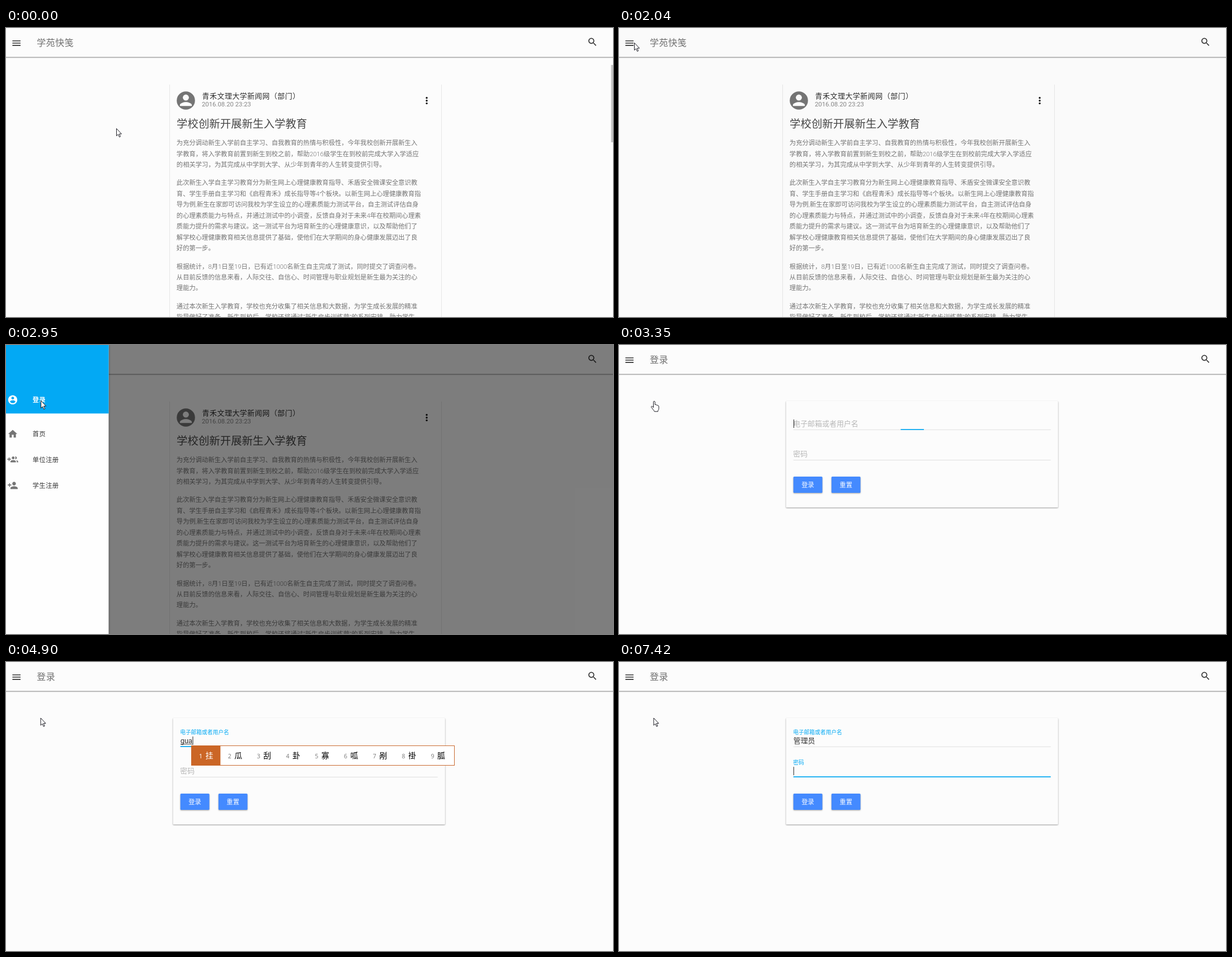
Animation, 1085 px wide and 516 px high, one loop 8000 ms. Source, as an HTML page:

```html
<!DOCTYPE html>
<html lang="zh-CN">
<head>
<meta charset="utf-8">
<title>登录演示</title>
<style>
  html, body { margin: 0; width: 100%; height: 100%; overflow: hidden; background: #fcfcfc; }
  svg { display: block; width: 1085px; height: 516px; }
  text { font-family: Roboto, "Noto Sans CJK SC", "Noto Sans CJK", sans-serif; white-space: pre; }
  .body { font-size: 11.34px; font-weight: 300; fill: #747474; }
  .title, .headline { font-family: "Noto Sans CJK SC Light", "Noto Sans CJK SC DemiLight", "Noto Sans CJK SC", "Noto Sans CJK", sans-serif; font-weight: 300; }
  .title { font-size: 16.2px; letter-spacing: .02em; fill: #707070; }
  .headline { font-size: 19.44px; fill: #484848; }
  .author { font-size: 12.96px; letter-spacing: .04em; fill: #2c2c2c; }
  .nav { font-size: 11.34px; font-weight: 500; letter-spacing: .04em; fill: #333; }
  .hint { font-size: 12.96px; font-weight: 300; fill: #b8b8b8; }
  .float { font-size: 9.72px; font-weight: 400; fill: #03a9f4; }
  .typed { font-size: 12.96px; fill: #333; }
  .button rect { fill: #448aff; filter: drop-shadow(0 1px 1px rgba(0,0,0,.35)); }
  .button text { font-size: 11.34px; fill: #fff; text-anchor: middle; }
  .card { fill: #fcfcfc; filter: drop-shadow(0 1px 1px rgba(0,0,0,.4)); }
  .pick { font-family: "Noto Sans CJK SC", "Noto Sans CJK", sans-serif; font-size: 13.9px; fill: #000; }
  .num { font-family: "Noto Sans", sans-serif; font-size: 10.5px; fill: #808080; }
  .on { fill: #fff; }
  .line { fill: #dcdcdc; }
  .focus { fill: #03a9f4; }
  .cursor { fill: #fff; stroke: #1c1c24; stroke-width: 1; stroke-linejoin: round; }
</style>
</head>
<body>
<svg viewBox="0 0 1085 516">
  <rect width="1085" height="516" fill="#fcfcfc"/>

  <!-- top bar -->
  <rect y="51.6" width="1085" height="1.4" fill="#ababab"/>
  <rect y="53" width="1085" height="1" fill="#e2e2e2"/>
  <path transform="translate(9 17.3) scale(.81)" fill="#333" d="M3 18h18v-2H3zM3 13h18v-2H3zM3 6v2h18V6z"/>
  <path transform="translate(1038.6 15.3) scale(.81)" fill="#333" d="M15.5 14h-.79l-.28-.27C15.41 12.59 16 11.11 16 9.5 16 5.91 13.09 3 9.5 3S3 5.91 3 9.5 5.91 16 9.5 16c1.61 0 3.09-.59 4.23-1.57l.27.28v.79l5 4.99L20.49 19l-4.99-5zm-6 0C7.01 14 5 11.99 5 9.5S7.01 5 9.5 5 14 7.01 14 9.5 11.99 14 9.5 14z"/>
  <text class="title" id="title" x="55" y="32"></text>

  <g id="home">
    <rect id="scroll" x="1081.5" y="66" width="3.5" height="138" fill="#c4c4c4"/>
    <path d="M292.5 101V516M778.5 101V516" stroke="#e6e6e6"/>
    <circle cx="321.5" cy="129.5" r="16.3" fill="#757575"/>
    <g fill="#fcfcfc">
      <circle cx="321.5" cy="124.2" r="5.4"/>
      <path d="M310.8 139.2v-1.4c0-3.6 7.1-5.5 10.7-5.5s10.7 1.9 10.7 5.5v1.4z"/>
    </g>
    <text class="author" x="350.5" y="125.8">青禾文理大学新闻网（部门）</text>
    <text x="350" y="140" font-size="11.34" fill="#858585">2016.08.20 23:23</text>
    <g fill="#111"><circle cx="752" cy="124.8" r="1.7"/><circle cx="752" cy="129.7" r="1.7"/><circle cx="752" cy="134.6" r="1.7"/></g>
    <text class="headline" x="305" y="177.6">学校创新开展新生入学教育</text>
    <g id="article"></g>
  </g>

  <g id="login">
    <rect class="card" x="298.5" y="100" width="486.3" height="190" rx="1.6"/>
    <rect class="line" x="311.7" y="150.8" width="460" height=".9"/>
    <rect class="line" x="311.7" y="205" width="460" height=".9"/>
    <rect class="focus" id="focusA" y="150" height="1.7"/>
    <rect class="focus" id="focusB" y="204.2" height="1.7"/>
    <text id="labelA">电子邮箱或者用户名</text>
    <text id="labelB">密码</text>
    <g class="button">
      <rect x="311.7" y="235" width="51.8" height="29" rx="1.6"/><text x="337.6" y="253.8">登录</text>
      <rect x="379.8" y="235" width="51.8" height="29" rx="1.6"/><text x="405.7" y="253.8">重置</text>
    </g>
    <text class="typed" id="typed" x="311.7"></text>
    <rect id="under" x="311.7" y="146.3" height=".9" fill="#333"/>
    <rect id="caret" width="1" height="15" fill="#222"/>
    <g id="popup"></g>
  </g>

  <rect id="shade" width="1085" height="516"/>

  <g id="drawer">
    <rect x="-20" width="203.5" height="516" fill="#fefefe" style="filter:drop-shadow(1px 0 1.5px rgba(0,0,0,.3))"/>
    <rect x="-20" width="203.5" height="122.3" fill="#03a9f4"/>
    <path transform="translate(2.3 88.2) scale(.81)" fill="#fff" d="M12 2C6.48 2 2 6.48 2 12s4.48 10 10 10 10-4.48 10-10S17.52 2 12 2zm0 3c1.66 0 3 1.34 3 3s-1.34 3-3 3-3-1.34-3-3 1.34-3 3-3zm0 14.2c-2.5 0-4.71-1.28-6-3.22.03-1.99 4-3.08 6-3.08 1.99 0 5.97 1.09 6 3.08-1.29 1.94-3.5 3.22-6 3.22z"/>
    <g fill="#757575">
      <path transform="translate(2.3 149) scale(.81)" d="M10 20v-6h4v6h5v-8h3L12 3 2 12h3v8z"/>
      <path transform="translate(2.3 195) scale(.81)" d="M8 10H5V7H3v3H0v2h3v3h2v-3h3v-2zm10 1c1.66 0 3-1.34 3-3s-1.34-3-3-3c-.32 0-.63.05-.91.14.57.81.9 1.79.9 2.86s-.34 2.04-.9 2.86c.28.09.59.14.91.14zm-5 0c1.66 0 3-1.34 3-3s-1.34-3-3-3-3 1.34-3 3 1.34 3 3 3zm6.62 2.16c.83.73 1.38 1.66 1.38 2.84v2h3v-2c0-1.54-2.37-2.49-4.38-2.84zM13 13c-2 0-6 1-6 3v2h12v-2c0-2-4-3-6-3z"/>
      <path transform="translate(2.3 241) scale(.81)" d="M15 12c2.21 0 4-1.79 4-4s-1.79-4-4-4-4 1.79-4 4 1.79 4 4 4zM6 10V7H4v3H1v2h3v3h2v-3h3v-2zm9 4c-2.67 0-8 1.34-8 4v2h16v-2c0-2.66-5.33-4-8-4z"/>
    </g>
    <g class="nav">
      <text x="47.4" y="102.2" fill="#fff" font-weight="700">登录</text>
      <text x="47.4" y="162.7">首页</text>
      <text x="47.4" y="208.8">单位注册</text>
      <text x="47.4" y="255">学生注册</text>
    </g>
  </g>

  <g class="cursor" id="cursor">
    <path id="arrow" d="M.5.5V13.6l3-2.7 2.1 4.8 2-.9-2.1-4.7h4z"/>
    <path id="hand" d="M4.5 11.5V1.8a1.4 1.4 0 0 1 2.8 0V6.5q2.3-.8 2.5.7 2.2-.5 2.3.9 2-.2 2 1.6v4q0 2-1.5 3.5v1.6H6.3q-.6-2-2.4-3.6L.9 11.2q-.9-1.4.5-1.9 1.1-.2 3.1 2.2z"/>
    <path id="beam" fill="none" d="M.5.5h2l.5.5.5-.5h2M3 1V15M.5 15.5h2l.5-.5.5.5h2"/>
  </g>
</svg>
<script>
const LOOP = 8000;
const $ = id => document.getElementById(id);

const paragraphs = [
  ['为充分调动新生入学前自主学习、自我教育的热情与积极性，今年我校创新开展新生入',
   '学教育，将入学教育前置到新生到校之前，帮助2016级学生在到校前完成大学入学适应',
   '的相关学习，为其完成从中学到大学、从少年到青年的人生转变提供引导。'],
  ['此次新生入学自主学习教育分为新生网上心理健康教育指导、禾盾安全微课安全意识教',
   '育、学生手册自主学习和《启程青禾》成长指导等4个板块。以新生网上心理健康教育指',
   '导为例,新生在家即可访问我校为学生设立的心理素质能力测试平台，自主测试评估自身',
   '的心理素质能力与特点，并通过测试中的小调查，反馈自身对于未来4年在校期间心理素',
   '质能力提升的需求与建议。这一测试平台为培育新生的心理健康意识，以及帮助他们了',
   '解学校心理健康教育相关信息提供了基础，使他们在大学期间的身心健康发展迈出了良',
   '好的第一步。'],
  ['根据统计，8月1日至19日，已有近1000名新生自主完成了测试，同时提交了调查问卷。',
   '从目前反馈的信息来看，人际交往、自信心、时间管理与职业规划是新生最为关注的心',
   '理能力。'],
  ['通过本次新生入学教育，学校也充分收集了相关信息和大数据，为学生成长发展的精准',
   '指导做好了准备。新生到校后，学校还将通过“新生启步训练营”的系列安排，助力学生']
];

// Each track row: start time, then the values held until the next row.
const cursorTrack = [
  [0, 'arrow', 197, 179], [930, 'arrow', 191, 168], [1080, 'arrow', 140, 112],
  [1200, 'arrow', 88, 54], [1350, 'beam', 54, 24], [1500, 'arrow', 43, 29],
  [1650, 'arrow', 33, 33], [1770, 'arrow', 26, 31], [1890, 'arrow', 22, 28],
  [2040, 'arrow', 27, 26], [2310, 'arrow', 36, 52], [2430, 'arrow', 52, 88],
  [2550, 'arrow', 63, 108], [2830, 'hand', 57, 100], [2950, 'arrow', 62, 99],
  [3350, 'hand', 57, 100], [3470, 'arrow', 61.5, 99.5]
];
const shadeTrack = [[0, 0], [2040, .006], [2190, .43], [2310, .5], [3350, 0]];
const drawerTrack = [[0, -250], [2190, -25], [2310, 0], [3350, -250]];
const focusATrack = [[0, 0, 0], [3350, 503.5, 545], [3470, 322, 760], [3620, 311.7, 771.7],
  [7150, 345, 740], [7270, 500, 556], [7420, 0, 0]];
const focusBTrack = [[0, 0, 0], [7150, 503.5, 545], [7270, 322, 760], [7420, 311.7, 771.7]];
const caretTrack = [[0, 0, 0], [3350, 312, 133], [3770, 0, 0], [4420, 319.5, 133],
  [4660, 326.5, 133], [4900, 333.5, 133], [5050, 340.5, 133], [5420, 345.5, 133],
  [5570, 349, 133], [6100, 358, 133], [6500, 351, 133.5], [7000, 0, 0], [7150, 311.8, 187.2]];
const typedTrack = [[0, ''], [4420, 'g'], [4660, 'gu'], [4900, 'gua'], [5050, 'guan'],
  [5420, "guan'l"], [5570, "guan'li"], [6100, "guan'li'y"], [6500, '管理员']];
const popupTrack = [[0, 0, ''],
  [4540, 317.5, '个 过 更 给 该 高 国 跟 管'],
  [4780, 324.5, '股 古 骨 故 顾 谷 鼓 孤 姑'],
  [4900, 331.5, '挂 瓜 刮 卦 寡 呱 剐 褂 胍'],
  [5170, 338.5, '管 关 观 官 馆 惯 灌 冠 罐'],
  [5420, 343.5, '管理 关联 惯例 官僚 关了 管 关'],
  [5570, 346.5, '管理 惯例 官吏 关里 管 关 观'],
  [6100, 355.5, '管理员 鹳狸猿 管理域 管理业 管理 惯例'],
  [6500, 0, '']];

function at(track, t) {
  let row = track[0];
  for (const r of track) if (r[0] <= t) row = r;
  return row.slice(1);
}

function show(id, on) { $(id).style.display = on ? '' : 'none'; }
function set(id, attrs) { for (const k in attrs) $(id).setAttribute(k, attrs[k]); }

function buildArticle() {
  let y = 209.2, out = '';
  for (const lines of paragraphs) {
    for (const line of lines) {
      out += `<text class="body" x="304.8" y="${y.toFixed(2)}">${line}</text>`;
      y += 19.44;
    }
    y += 12.96;
  }
  $('article').innerHTML = out;
}

let shownPopup;
function drawPopup(left, words) {
  const key = left + words;
  if (key === shownPopup) return;
  shownPopup = key;
  if (!words) { $('popup').innerHTML = ''; return; }
  let x = left, out = `<rect x="${left}" y="149.5" width="470" height="35" fill="#fff" stroke="#c96a30"/>`;
  words.split(' ').forEach((word, i) => {
    const w = 37.9 + 13.9 * word.length, on = i ? '' : ' on';
    if (!i) out += `<rect x="${x}" y="149.5" width="${w}" height="35" fill="#cb6626"/>`;
    out += `<text class="num${on}" x="${x + 13.5}" y="171.8">${i + 1}</text>` +
           `<text class="pick${on}" x="${x + 25}" y="172.3">${word}</text>`;
    x += w;
  });
  $('popup').innerHTML = out;
}

function drawLabel(id, up, x, low, high) {
  set(id, { class: up ? 'float' : 'hint', x, y: up ? high : low });
}

function drawFocus(id, track, t) {
  const [a, b] = at(track, t);
  set(id, { x: a, width: b - a });
}

function draw(t) {
  const login = t >= 3350;
  show('home', !login);
  show('login', login);
  show('scroll', t < 2040);
  $('title').textContent = login ? '登录' : '学苑快笺';

  set('shade', { 'fill-opacity': at(shadeTrack, t)[0] });
  const [slide] = at(drawerTrack, t);
  show('drawer', slide > -250);
  set('drawer', { transform: `translate(${slide} 0)` });

  drawFocus('focusA', focusATrack, t);
  drawFocus('focusB', focusBTrack, t);
  drawLabel('labelA', t >= 3470, 311.2, 144.6, 128.8);
  drawLabel('labelB', t >= 7270, 311.2, 199.4, 183.2);

  const composing = t >= 4420 && t < 6500;
  const [cx, cy] = at(caretTrack, t);
  show('caret', cx > 0);
  set('caret', { x: cx, y: cy });
  $('typed').textContent = at(typedTrack, t)[0];
  set('typed', { y: composing ? 144.5 : 145.4 });
  show('under', composing);
  set('under', { width: Math.max(0, cx - 312) });
  drawPopup(...at(popupTrack, t));

  const [kind, x, y] = at(cursorTrack, t);
  for (const k of ['arrow', 'hand', 'beam']) show(k, k === kind);
  set('cursor', { transform: `translate(${x} ${y})` });
}

buildArticle();
const start = performance.now();
function tick() {
  draw((performance.now() - start) % LOOP);
  requestAnimationFrame(tick);
}
tick();
</script>
</body>
</html>
```
